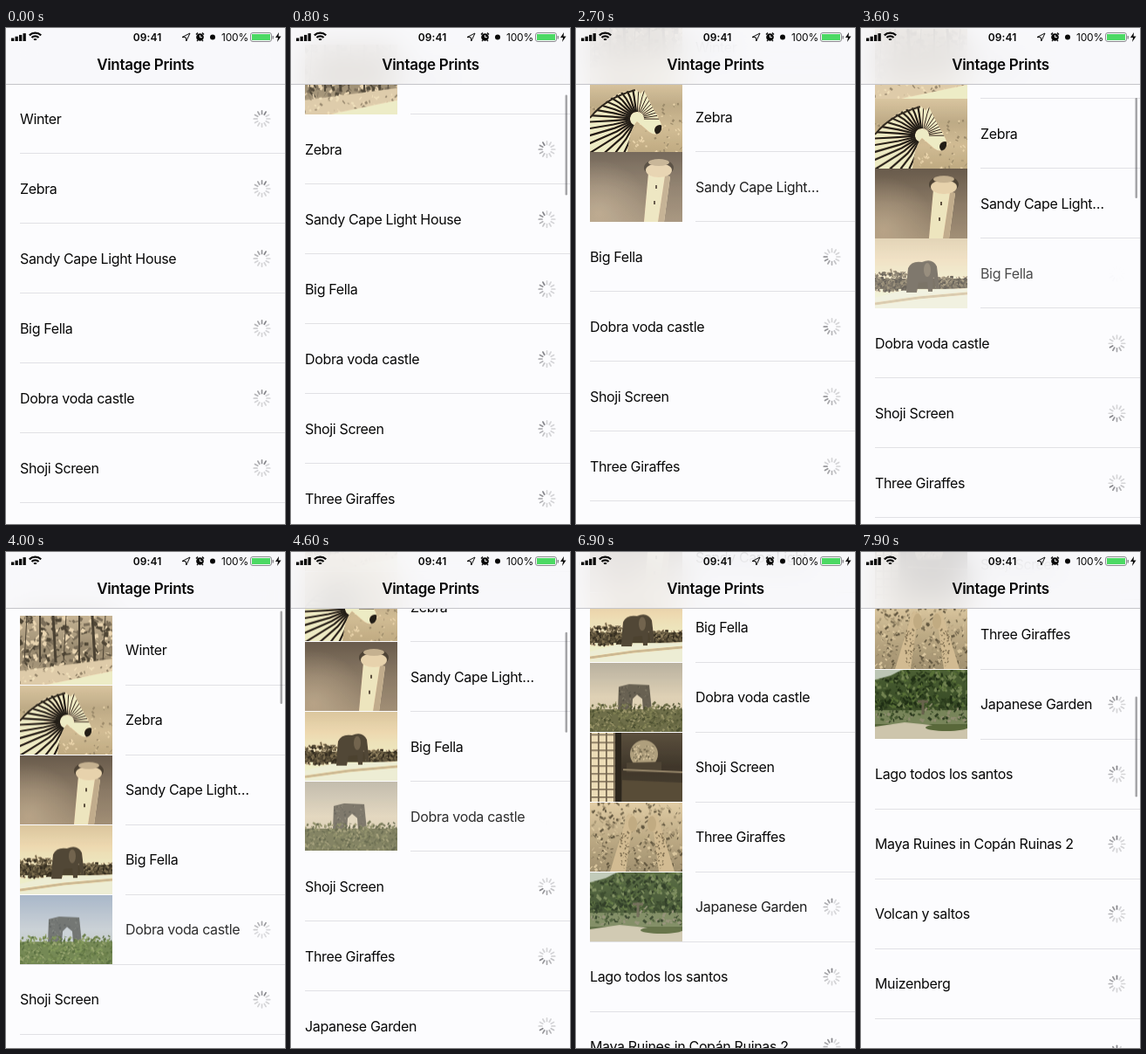
These frames come from a looping animation (320x568 px, 8 s). An HTML page with a canvas:

```html
<!DOCTYPE html>
<html lang="en">
<head>
<meta charset="utf-8">
<title>Vintage Prints</title>
<style>
html, body { margin: 0; width: 100%; height: 100%; overflow: hidden; background: #fcfcfe; }
canvas { display: block; }
</style>
</head>
<body>
<canvas id="stage" width="320" height="568"></canvas>
<script>
const stage = document.getElementById('stage'), g = stage.getContext('2d');
const LOOP = 8000, ROW = 80, TOP = 64, PW = 106, FADE = 320;
const LOADED = 8, TONED = 7; // photos that arrive, and get their sepia tone, within the loop
const INK = '#080808', PAPER = '#fcfcfe';
const clamp = v => Math.max(0, Math.min(1, v));

const titles = ['Winter', 'Zebra', 'Sandy Cape Light House', 'Big Fella', 'Dobra voda castle',
  'Shoji Screen', 'Three Giraffes', 'Japanese Garden', 'Lago todos los santos',
  'Maya Ruines in Copán Ruinas 2', 'Volcan y saltos', 'Muizenberg', ''];

const tonedAt = i => i < TONED ? 490 + 960 * i : Infinity;
const loadedAt = i => i < LOADED ? Math.max(200, 960 * i - 110) : Infinity;

// start, end, from, to
const moves = [
  [400, 1100, 0, 82],
  [3480, 3850, 82, -13],
  [3850, 4200, -13, 0],
  [4250, 4923, 0, 257.5],
  [7300, 7900, 257.5, 489.5]
];

function scrollAt(t) {
  let s = 0;
  for (const [a, b, from, to] of moves) {
    if (t < a) break;
    const p = clamp((t - a) / (b - a));
    s = from + (to - from) * (1 - (1 - p * p) ** 2);
  }
  return s;
}

const barAlpha = t => Math.max(...moves.map(([a, b]) => t < a ? 0 : clamp((b + 400 - t) / 250)));

// ---- drawing helpers ----
function random(seed) {
  return () => (seed = (seed * 16807) % 2147483647) / 2147483647;
}
function box(c, color, x, y, w, h) {
  c.fillStyle = color;
  c.fillRect(x, y, w, h);
}
function fill(c, color, path) {
  c.fillStyle = color;
  c.fill(new Path2D(path));
}
function line(c, color, width, path) {
  c.strokeStyle = color;
  c.lineWidth = width;
  c.stroke(new Path2D(path));
}
function oval(c, color, x, y, rx, ry = rx) {
  c.fillStyle = color;
  c.beginPath();
  c.ellipse(x, y, rx, ry, 0, 0, 7);
  c.fill();
}
function shade(c, ...colors) {
  const f = c.createLinearGradient(0, 0, 0, ROW);
  colors.forEach((k, i) => f.addColorStop(i / (colors.length - 1), k));
  box(c, f, 0, 0, PW, ROW);
}
// short random strokes in a band: leaves, grass, twigs
function scatter(c, colors, n, x, y, w, h, size) {
  const r = random(n);
  for (let i = 0; i < n; i++) {
    const a = x + r() * w, b = y + r() * h;
    line(c, colors[i % colors.length], .5 + r() * size / 3,
      `M${a} ${b}l${(r() - .5) * size} ${(r() - .5) * size}`);
  }
}

// ---- photos, in their colours before toning ----
const scenes = [
  c => {
    shade(c, '#b8ae9e', '#8f8370', '#a99d89');
    scatter(c, ['#4d4333', '#75695a', '#d6cdbd'], 240, 0, 0, PW, 58, 14);
    for (let i = 0; i < 7; i++) line(c, '#4a3f2f', 1 + i % 3, `M${8 + i * 15} 0l${i % 3 * 3 - 3} 54`);
    fill(c, '#cbc3b4', 'M0 64L106 50V80H0Z');
    scatter(c, ['#8d816e', '#ded6c8'], 60, 0, 58, PW, 20, 7);
    fill(c, '#e8e2d6', 'M30 80L106 64V80Z');
  },
  c => {
    shade(c, '#c9bda4', '#b3a484', '#c5b491', '#b8a579');
    scatter(c, ['#958565', '#d8cbad'], 130, 0, 24, PW, 56, 6);
    const body = new Path2D('M0 42Q16 20 36 12L52 8L58 13L62 9L66 18L79 42Q85 52 80 58Q75 62 68 57L54 45Q46 52 43 80H0Z');
    c.save();
    c.clip(body);
    box(c, '#e9e1d2', 0, 0, PW, ROW);
    // stripes fan out from the throat
    for (let a = 1.7; a < 6.4; a += .17) {
      const x = Math.cos(a), y = Math.sin(a);
      line(c, '#231c14', 1 + 1.2 * (a < 4.7), `M${54 + x * 8} ${42 + y * 8}L${54 + x * 28} ${42 + y * 26}L${54 + x * 80} ${42 + y * 60}`);
    }
    oval(c, '#231c14', 80, 55, 6);
    c.restore();
    line(c, '#2f2619', 2, 'M0 41Q18 18 52 9');
  },
  c => {
    shade(c, '#66554f', '#84726a', '#9a877b');
    const glow = c.createRadialGradient(10, 70, 2, 10, 70, 60);
    glow.addColorStop(0, '#b8a69aaa');
    glow.addColorStop(1, '#b8a69a00');
    box(c, glow, 0, 0, PW, ROW);
    fill(c, '#e6dccb', 'M67 24L92 28L85 80H62Z');
    fill(c, '#b5a590', 'M86 27L92 28L85 80H78Z');
    oval(c, '#4d3f35', 79, 18, 17, 10);
    oval(c, '#d5c9b5', 79, 21, 15, 8);
    oval(c, '#b8a994', 79, 12, 12, 4);
    for (let i = 0; i < 2; i++) box(c, '#5b4c3c', 75 - i * 2, 38 + i * 18, 2, 4);
  },
  c => {
    shade(c, '#cbbf9f', '#e4dcc6', '#f3eee2');
    box(c, '#4b4026', 0, 46, PW, 12);
    scatter(c, ['#352c19', '#5e5130', '#7c6c43'], 190, 0, 38, 36, 22, 8);
    scatter(c, ['#352c19', '#675936', '#8b7b51'], 140, 72, 44, 34, 14, 8);
    fill(c, '#f5f1e8', 'M0 68L30 60L106 57V80H0Z');
    line(c, '#c0b18d', 3, 'M0 75L50 68L106 63');
    fill(c, '#504432', 'M38 34Q42 25 54 27Q66 22 71 32L74 58L70 58L67 44L66 61H61L60 50L50 51L48 62H36L37 44Z');
    oval(c, '#6e604a', 60, 36, 4, 8);
  },
  c => {
    shade(c, '#9aabc0', '#c2cad0', '#b8bfae');
    fill(c, '#5b5f5c', 'M33 28L45 25L68 26L71 56H32Z');
    scatter(c, ['#474b49', '#70746e'], 70, 35, 28, 32, 26, 4);
    fill(c, '#c3cbd0', 'M48 56L49 42L54 37L60 42L61 56Z');
    box(c, '#5d7437', 0, 54, PW, 26);
    scatter(c, ['#3f5821', '#6d873e', '#526a2b', '#869657'], 420, 0, 48, PW, 32, 7);
  },
  c => {
    shade(c, '#5a4c3c', '#3f3427', '#4b3e2e');
    box(c, '#ddd4c2', 0, 0, 29, ROW);
    for (let i = 0; i < 9; i++) {
      box(c, '#70614c', 0, 2 + i * 9, 29, 1.5);
      box(c, '#70614c', i % 4 * 9, 0, 1.5, ROW);
    }
    box(c, '#2c241a', 29, 0, 7, ROW);
    oval(c, '#a39a7c', 62, 25, 16);
    scatter(c, ['#6d6547', '#c9c1a5'], 70, 50, 16, 24, 16, 5);
    fill(c, '#4d412f', 'M42 35L82 34V46H42Z');
    line(c, '#8e8065', 2, 'M38 43L106 46');
    fill(c, '#58482f', 'M37 55L106 58V80H37Z');
  },
  c => {
    shade(c, '#d1c6a9', '#b3a582', '#988b69');
    scatter(c, ['#786b4b', '#cbc09f', '#a09370', '#625638'], 360, 0, 0, PW, ROW, 8);
    for (const way of [-1, 1]) {
      c.save();
      c.translate(60 + way * 9, 0);
      c.scale(way, 1);
      fill(c, '#c8b48b', 'M0 16L7 13L11 24L28 80H10L4 35L-3 31Z');
      scatter(c, ['#7e6743'], 45, 6, 32, 10, 45, 4);
      oval(c, '#bba477', 2, 25, 5, 9);
      c.restore();
    }
  },
  c => {
    shade(c, '#4c6034', '#384b26', '#667444');
    scatter(c, ['#2c3d1d', '#587037', '#1f2e15', '#738452'], 380, 0, 0, PW, 46, 10);
    fill(c, '#bcc6b4', 'M0 0H32L18 7L0 12Z');
    box(c, '#78855a', 0, 47, PW, 16);
    scatter(c, ['#455830', '#8f8c70', '#2d3c20'], 100, 0, 43, PW, 18, 8);
    line(c, '#68634d', 3, 'M55 35V52M49 37H61');
    fill(c, '#cdc5ac', 'M0 66L34 61L106 68V80H0Z');
    oval(c, '#59683a', 82, 67, 24, 4);
  }
];

const photos = scenes.map(draw => ['none', 'sepia(.6) brightness(.93)'].map(filter => {
  const raw = document.createElement('canvas'), out = document.createElement('canvas');
  raw.width = out.width = PW;
  raw.height = out.height = ROW;
  draw(raw.getContext('2d'));
  const o = out.getContext('2d');
  o.filter = filter;
  o.drawImage(raw, 0, 0);
  return out;
}));

// ---- interface ----
function text(str, x, y, font, spacing = 0, align = 'left') {
  g.font = font + ' Inter, Roboto, sans-serif';
  g.letterSpacing = spacing + 'px';
  g.textAlign = align;
  g.fillStyle = INK;
  g.fillText(str, x, y);
}

function spinner(x, y, t) {
  const lead = Math.floor(t * .012 + 1.5);
  g.save();
  g.translate(x, y);
  g.lineCap = 'round';
  for (let i = 0; i < 12; i++) {
    const age = (lead - i + 1200) % 12;
    line(g, `rgba(95,95,100,${Math.max(.25, .75 - age * .1)})`, 1.7, 'M0 -5.5V-9.2');
    g.rotate(Math.PI / 6);
  }
  g.restore();
}

// state: 0 waiting, 1 photo loaded, 2 photo toned
function cell(i, y, state, alpha, t) {
  const x = state ? 137 : 16, title = titles[i];
  g.globalAlpha = alpha;
  if (state) g.drawImage(photos[i][state - 1], 16, y, PW, 79.5);
  text(state && title.length > 18 ? title.slice(0, 16) + '…' : title, x, y + 45.7, '400 16px', -.35);
  if (state < 2) spinner(293.5, y + 40, t);
  g.globalAlpha = 1;
  box(g, '#e1e1e5', x, Math.round(y + 79), 320, 1);
}

function row(i, y, t) {
  const state = (t >= loadedAt(i)) + (t >= tonedAt(i));
  const since = [-Infinity, loadedAt(i), tonedAt(i)][state];
  const p = clamp((t - since) / FADE);
  if (p < 1) cell(i, y, state - 1, (1 - p) ** 3, t);
  cell(i, y, state, p, t);
}

function statusBar() {
  for (let i = 0; i < 4; i++) box(g, INK, 6 + i * 4.5, 11.5 - i * 1.8, 3.3, 3.5 + i * 1.8);
  for (let r = 2; r < 11; r += 3.7) {
    g.strokeStyle = INK;
    g.lineWidth = 2.2;
    g.beginPath();
    g.arc(33.5, 15, r, -2.36, -.78);
    g.stroke();
  }
  text('09:41', 162, 14.5, '600 12px', .1, 'center');
  line(g, INK, 1, 'M202 10.5L211 6L206.8 15L206.3 10.8Z');
  oval(g, INK, 222.5, 10.5, 4.3);
  line(g, INK, 1.4, 'M218 7.5l2 -2m5 0l2 2M220 14l-1 1m6 -1l1 1');
  line(g, '#fff', 1, 'M222.5 8V10.7H225');
  oval(g, INK, 237, 10.5, 3);
  text('100%', 247, 14.5, '400 12px', -.2);
  g.beginPath();
  g.roundRect(280.5, 5.5, 24, 10, 2.5);
  g.strokeStyle = '#8c8c90';
  g.stroke();
  box(g, '#4cd964', 282, 7, 21, 7);
  box(g, '#8c8c90', 305.5, 9, 1.5, 3.5);
  fill(g, INK, 'M313 5L309 11H312L311 16L315.5 9.5H312.5Z');
}

// translucent bar: the list shows through, blurred
function header() {
  g.save();
  g.beginPath();
  g.rect(0, 0, 320, TOP);
  g.clip();
  g.filter = 'blur(18px)';
  g.drawImage(stage, 0, 0);
  g.filter = 'none';
  box(g, 'rgba(248,248,250,.82)', 0, 0, 320, TOP);
  g.restore();
  box(g, '#c4c4c9', 0, TOP, 320, 1);
  statusBar();
  text('Vintage Prints', 160, 48, '600 17px', -.3, 'center');
}

function frame() {
  const t = (performance.now() - start) % LOOP, s = scrollAt(t);
  box(g, PAPER, 0, 0, 320, 568);
  titles.forEach((_, i) => {
    const y = TOP + i * ROW - s;
    if (y > -ROW && y < 568) row(i, y, t);
  });
  g.fillStyle = `rgba(60,60,64,${.45 * barAlpha(t)})`;
  g.beginPath();
  g.roundRect(314.5, 67.5 + .2 * Math.max(0, s), 2.5, 115 + Math.min(0, s), 1.25);
  g.fill();
  header();
  requestAnimationFrame(frame);
}

const start = performance.now();
frame();
</script>
</body>
</html>
```
